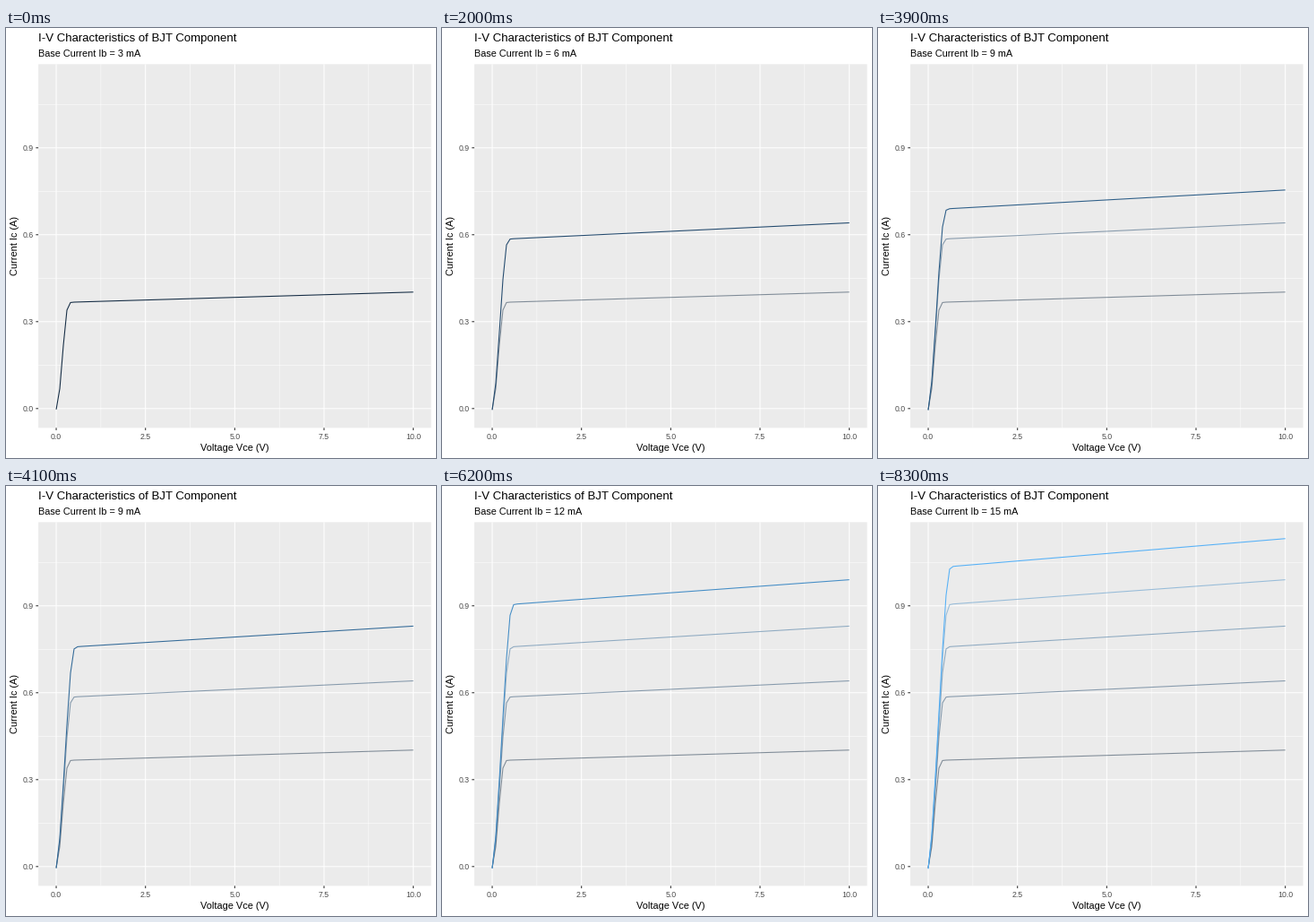
Recreate the animation shown at these times as a matplotlib script. Size 480x480 px, loop 10000 ms.

```python
import numpy as np
import matplotlib.pyplot as plt
from matplotlib.animation import FuncAnimation
from matplotlib.colors import to_rgb
from matplotlib.patches import Rectangle

plt.rcParams["font.family"] = "Liberation Sans"

SIZE = 480
LEFT, RIGHT, TOP, BOTTOM = 36.1, 474.5, 40.4, 446.3
STEP_MS = 100
FRAMES = 100
CYCLE = 21      # frames from one transition to the next
MOVE = 5        # frames per transition
FIRST = 16      # frame where the first transition starts

BASE_MA = [3, 6, 9, 12, 15]
SAT_CURRENT = [0.3655, 0.5827, 0.7545, 0.900, 1.029]
COLORS = [np.array(to_rgb(c)) for c in
          ("#132B43", "#22496D", "#336A98", "#448DC6", "#56B1F7")]


def px(v):
    return 56.05 + 39.86 * v


def py(i):
    return 424.8 - 323.4 * i


def collector_current(v, sat):
    """Saturation knee with series resistance, plus the Early effect."""
    resistance, slope, offset, reverse = 0.35, 37, 4.15, 0.025
    lo, hi = np.zeros_like(v), np.ones_like(v)
    for _ in range(40):
        g = (lo + hi) / 2
        share = g * (1 + reverse) - reverse
        drive = slope * (v - resistance * sat * share) - offset
        low = g < 1 / (1 + np.exp(-drive))
        lo, hi = np.where(low, g, lo), np.where(low, hi, g)
    return sat * (g * (1 + reverse) - reverse) * (1 + v / 100)


volts = np.arange(101) / 10
curves = [collector_current(volts, s) for s in SAT_CURRENT]

fig = plt.figure(figsize=(SIZE / 72, SIZE / 72), dpi=72, facecolor="white")
ax = fig.add_axes([0, 0, 1, 1])
ax.set(xlim=(0, SIZE), ylim=(SIZE, 0))
ax.axis("off")


def line(x, y, color, width, z, **kw):
    return ax.plot(x, y, color=color, lw=width, zorder=z, snap=False,
                   solid_capstyle="butt", solid_joinstyle="round", **kw)[0]


def text(x, y, s, size, color="black", **kw):
    kw.setdefault("va", "baseline")
    return ax.text(x, y, s, fontsize=size, color=color, **kw)


def grid_x(v, width):
    line([px(v)] * 2, [TOP, BOTTOM], "white", width, 2)


def grid_y(i, width):
    line([LEFT, RIGHT], [py(i)] * 2, "white", width, 2)


ax.add_patch(Rectangle((LEFT, TOP), RIGHT - LEFT, BOTTOM - TOP,
                       fc="#EBEBEB", lw=0, zorder=1, snap=False))
for v in (1.25, 3.75, 6.25, 8.75):
    grid_x(v, 0.53)
for i in (0.15, 0.45, 0.75, 1.05):
    grid_y(i, 0.53)
for v in (0, 2.5, 5, 7.5, 10):
    grid_x(v, 1.07)
    line([px(v)] * 2, [BOTTOM, BOTTOM + 2.75], "#333333", 1.07, 3)
    text(px(v), 459.0, f"{v:.1f}", 8.8, "#4D4D4D", ha="center")
for i in (0, 0.3, 0.6, 0.9):
    grid_y(i, 1.07)
    line([LEFT - 2.75, LEFT], [py(i)] * 2, "#333333", 1.07, 3)
    text(31.2, py(i) + 3.1, f"{i:.1f}", 8.8, "#4D4D4D", ha="right")

text(LEFT, 15, "I-V Characteristics of BJT Component", 13.2)
subtitle = text(LEFT, 32, "", 10.85)
text((LEFT + RIGHT) / 2, 472, "Voltage Vce (V)", 11, ha="center")
text(13.2, (TOP + BOTTOM) / 2, "Current Ic (A)", 11, rotation=90,
     ha="right", va="center", rotation_mode="default").set(
         ha="center", va="baseline", rotation_mode="anchor")

shadows = [line(px(volts), py(c), col, 1.07, 4, alpha=0.5)
           for c, col in zip(curves, COLORS)]
active = line(px(volts), py(curves[0]), COLORS[0], 1.07, 5)


def update(n):
    if n < FIRST:
        pos = 0.0
    else:
        k, r = divmod(n - FIRST, CYCLE)
        pos = k + min((r + 1) / MOVE, 1)
    a = int(pos)
    b = min(a + 1, len(curves) - 1)
    t = pos - a
    active.set_ydata(py(curves[a] + (curves[b] - curves[a]) * t))
    active.set_color(COLORS[a] + (COLORS[b] - COLORS[a]) * t)
    for j, s in enumerate(shadows):
        s.set_visible(j < pos)
    subtitle.set_text(f"Base Current Ib = {BASE_MA[round(pos)]} mA")
    return [active, subtitle, *shadows]


anim = FuncAnimation(fig, update, frames=FRAMES, interval=STEP_MS,
                     repeat=True, repeat_delay=0, blit=False)
plt.show()
```
